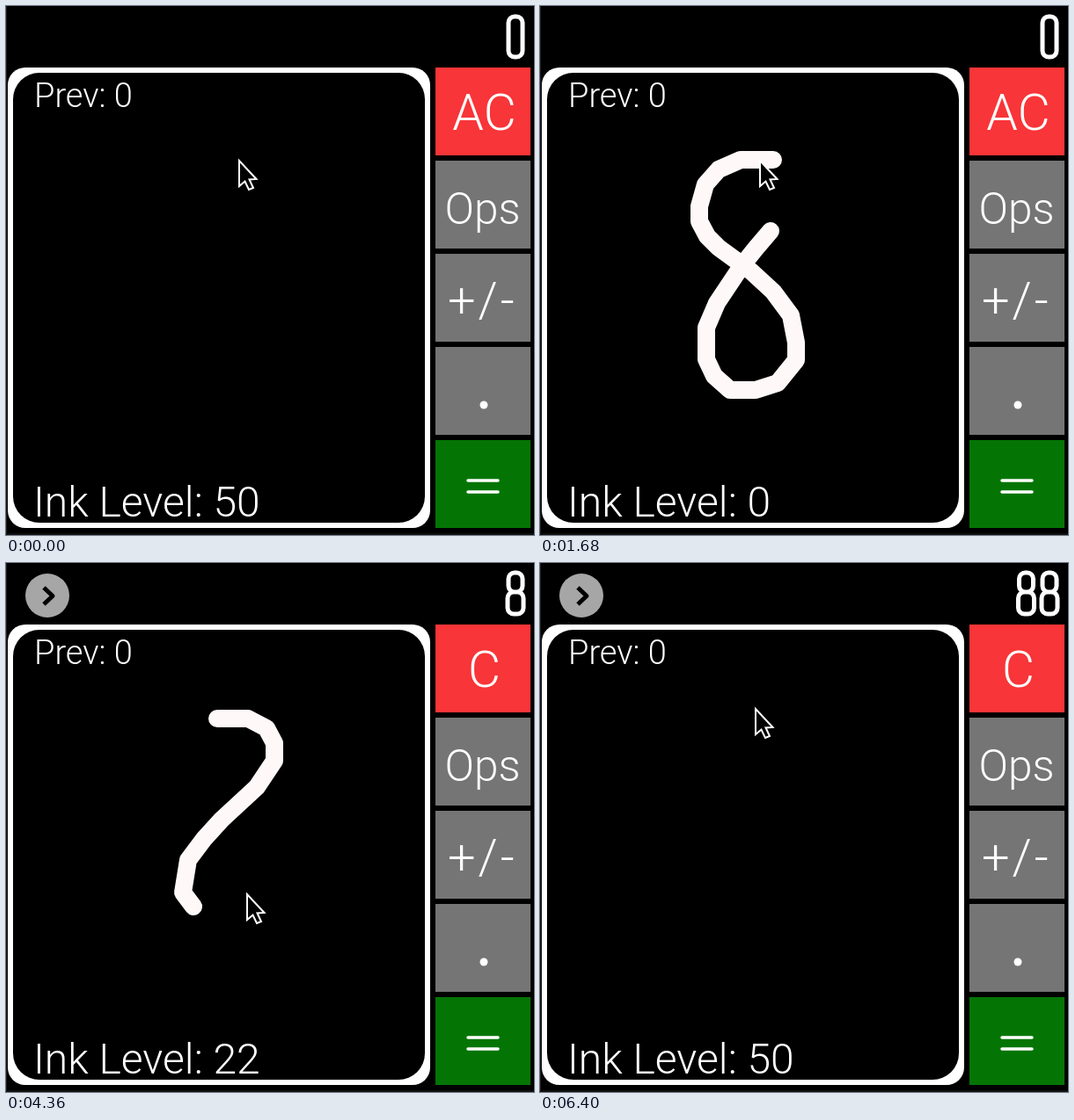
Recreate the animation shown at these times as an HTML page with a canvas. Size 600x602 px, loop 7.2 s.

```html
<!DOCTYPE html>
<html lang="en">
<head>
<meta charset="utf-8">
<title>Handwriting calculator</title>
<style>
  html, body { margin: 0; width: 100%; height: 100%; overflow: hidden; background: #000; }
  canvas { display: block; }
</style>
</head>
<body>
<canvas id="stage" width="600" height="602"></canvas>
<script>
const ctx = document.getElementById('stage').getContext('2d');
const LOOP = 7200, STEP = 40;
const lerp = (a, b, k) => a + (b - a) * k;

// Each key: time, last inked point, cursor point, ink left.
const strokes = [
  {
    points: [[265, 175], [228, 175], [203, 186], [188, 203], [181, 228], [181, 245], [190, 262],
      [203, 275], [240, 302], [265, 325], [285, 352], [291, 383], [291, 403], [270, 429],
      [245, 437], [216, 437], [198, 421], [189, 402], [189, 366], [201, 338], [229, 296],
      [245, 276], [262, 256], [282, 232], [287, 208], [272, 186], [249, 174]],
    keys: [[360, 0, 0, 49], [1280, 19, 20, 8], [1440, 22, 23, 0], [1680, 22, 26, 0]],
    clear: 2000, result: 2760
  },
  {
    points: [[240, 177], [275, 177], [296, 188], [305, 205], [305, 225], [285, 255], [245, 292],
      [225, 314], [207, 338], [201, 375], [213, 391], [248, 392], [273, 375], [280, 357],
      [273, 328], [258, 306], [235, 284], [213, 264], [198, 240], [191, 217], [196, 190],
      [218, 170], [244, 164]],
    keys: [[3680, 0, 0, 49], [3800, 0, 0, 49], [4360, 10, 12, 22], [4760, 19, 20, 0], [4920, 19, 22, 0]],
    clear: 5400, result: 6160
  }
];

function sample(keys, t) {
  const i = keys.findIndex(k => k[0] > t);
  if (i < 0) return keys[keys.length - 1];
  const a = keys[i - 1], b = keys[i], k = (t - a[0]) / (b[0] - a[0]);
  return a.map((v, j) => lerp(v, b[j], k));
}

function pointAt(points, pos) {
  const i = Math.floor(pos), a = points[i], b = points[i + 1] || a;
  return [lerp(a[0], b[0], pos - i), lerp(a[1], b[1], pos - i)];
}

function cursorAt(t) {
  if (t < 360) return [264, t < 40 ? 174 : t < 80 ? 173 : 172];
  if (t >= 1680 && t <= 3800) {
    const k = Math.min(1, Math.max(0, (t - 2720) / 320));
    return [lerp(249, 238, k), 174];
  }
  const s = strokes[t < 1680 ? 0 : 1];
  return pointAt(s.points, sample(s.keys, t)[2]);
}

function box(x, y, w, h, r, color) {
  ctx.fillStyle = color;
  ctx.beginPath();
  ctx.roundRect(x, y, w, h, r);
  ctx.fill();
}

function disc(x, y, r, color) {
  ctx.fillStyle = color;
  ctx.beginPath();
  ctx.arc(x, y, r, 0, 7);
  ctx.fill();
}

function line(points, width, color, cap = 'round') {
  ctx.strokeStyle = color;
  ctx.lineWidth = width;
  ctx.lineCap = cap;
  ctx.lineJoin = 'round';
  ctx.beginPath();
  points.forEach(p => ctx.lineTo(...p));
  ctx.stroke();
}

function text(str, x, y, size, align = 'left', spacing = 0) {
  ctx.font = `300 ${size}px Roboto, sans-serif`;
  ctx.letterSpacing = spacing + 'px';
  ctx.textAlign = align;
  ctx.fillStyle = '#fff';
  ctx.fillText(str, x, y);
}

// Tall narrow display digits
function digit(value, x) {
  ctx.strokeStyle = '#fff';
  ctx.lineWidth = 5;
  ctx.beginPath();
  if (value === '0') ctx.roundRect(x + 2, 12, 16, 46, 7);
  else {
    ctx.roundRect(x + 2, 11, 16, 22, 7);
    ctx.roundRect(x + 1, 33, 18, 25, 7);
  }
  ctx.stroke();
}

function drawButtons(label) {
  ['#f83538', '#757575', '#757575', '#757575', '#047504'].forEach((color, i) =>
    box(488, 70 + i * 106, 108, 100, 0, color));
  text(label, 543.5, 141, 57, 'center');
  text('Ops', 541.5, 248, 49.5, 'center');
  text('+/-', 502, 354, 56, 'left', 3);
  disc(543, 454, 4.5, '#fff');
  for (const y of [540, 553]) line([[525, y], [559, y]], 3.5, '#fff');
}

function drawSpinner(elapsed) {
  const head = Math.floor(elapsed * 12 / 1000) + 11;
  for (let i = 0; i < 12; i++) {
    const a = (head - i) * Math.PI / 6, s = Math.sin(a), c = -Math.cos(a);
    ctx.globalAlpha = Math.max(0, 1 - i * 0.08 - (i > 6 ? 0.5 : 0));
    line([[442 + 11 * s, 104 + 11 * c], [442 + 18 * s, 104 + 18 * c]], 3, '#fff');
  }
  ctx.globalAlpha = 1;
}

function drawArrow(alpha) {
  ctx.globalAlpha = alpha;
  disc(47, 37, 25, '#a6a6a6');
  line([[43, 28], [53, 37.5], [43, 47]], 5, '#000', 'butt');
  ctx.globalAlpha = 1;
}

function drawCursor([x, y]) {
  ctx.save();
  ctx.translate(x, y);
  ctx.beginPath();
  [[1, 2], [1, 31], [7.5, 25.5], [12, 35], [17, 33], [12.5, 23.5], [20.5, 23]].forEach(p => ctx.lineTo(...p));
  ctx.closePath();
  ctx.fillStyle = '#000';
  ctx.strokeStyle = '#fff';
  ctx.lineWidth = 2;
  ctx.lineJoin = 'miter';
  ctx.fill();
  ctx.stroke();
  ctx.restore();
}

function draw(t) {
  box(0, 0, 600, 602, 0, '#000');
  box(0, 0, 1, 602, 0, '#222');
  box(0, 600, 600, 2, 0, '#111');
  box(2, 70, 480, 524, 20, '#fff');
  box(8, 76, 468, 512, 30, '#000');

  const shown = t < strokes[0].result ? '0' : t < strokes[1].result ? '8' : '88';
  [...shown].reverse().forEach((d, i) => digit(d, 569 - i * 26.5));
  drawButtons(shown === '0' ? 'AC' : 'C');
  if (shown !== '0') drawArrow(Math.min(1, (t - 2720) / 320));

  let ink = 50;
  for (const s of strokes) {
    if (t >= s.keys[0][0] && t < s.clear) {
      const [, pos, , left] = sample(s.keys, t);
      ink = Math.round(left);
      if (pos > 0) line([...s.points.slice(0, Math.floor(pos) + 1), pointAt(s.points, pos)], 20, '#fff8f8');
    } else if (t >= s.clear && t < s.result) drawSpinner(t - s.clear);
  }
  text('Prev: 0', 32, 115, 38);
  text('Ink Level: ' + ink, 31, 581, 48);
  drawCursor(cursorAt(t));
}

const start = performance.now();
function tick() {
  const t = (performance.now() - start) % LOOP;
  draw(Math.floor(t / STEP) * STEP);
  requestAnimationFrame(tick);
}
tick();
</script>
</body>
</html>
```
